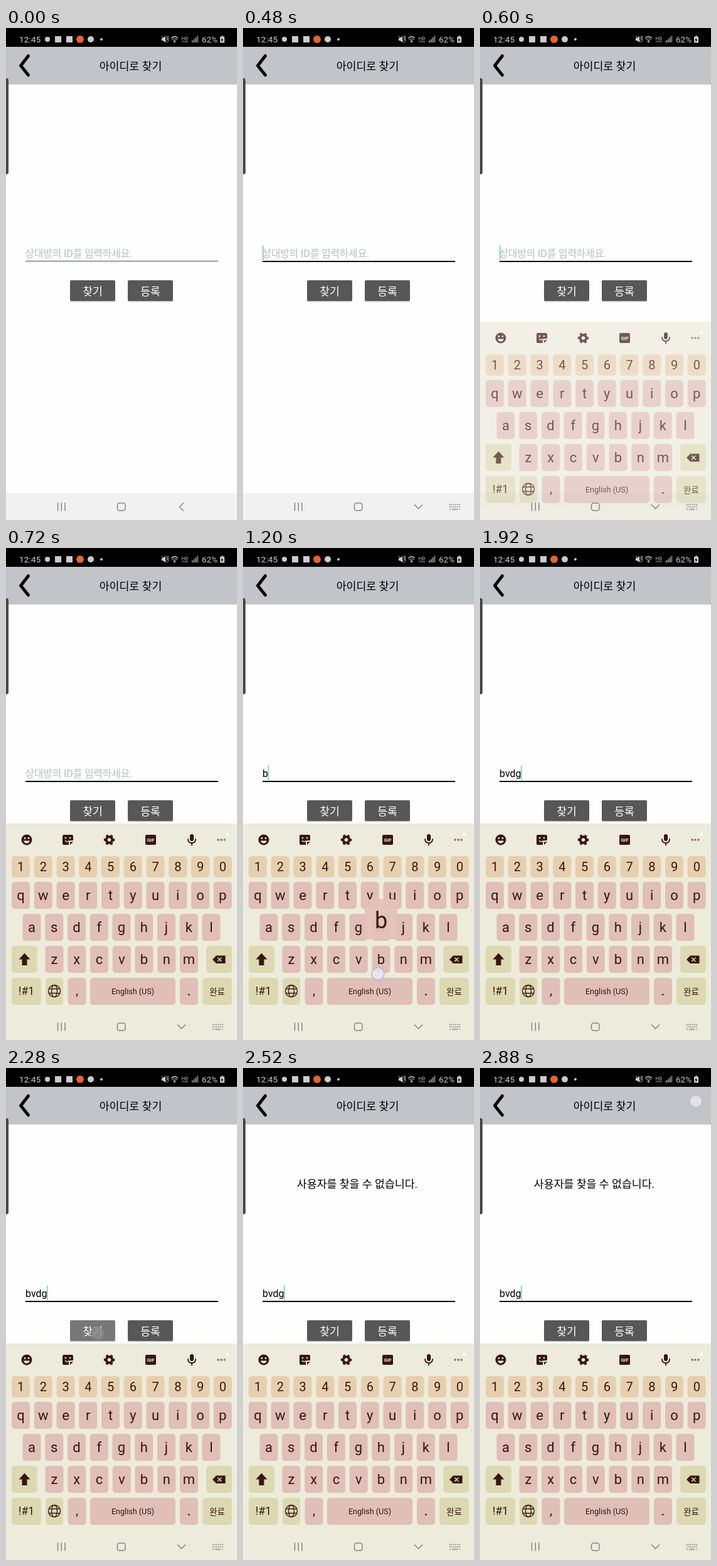
These frames come from a looping animation (368 by 784 pixels, 3000 ms). An HTML page:

```html
<!DOCTYPE html>
<html lang="ko">
<head>
<meta charset="utf-8">
<title>아이디로 찾기</title>
<style>
  html, body { margin: 0; height: 100%; overflow: hidden; background: #fefefe; }
  svg { display: block; width: 368px; height: 784px; }
  text { font-family: Roboto, "Noto Sans CJK KR", "Noto Sans CJK", sans-serif; }
  .mid { text-anchor: middle; }
  .line { fill: none; stroke-linecap: round; stroke-linejoin: round; }
</style>
</head>
<body>
<svg viewBox="0 0 368 784">
  <rect width="368" height="784" fill="#fefefe"/>

  <!-- status bar -->
  <rect width="368" height="30"/>
  <g fill="#ccc">
    <text x="21" y="23" font-size="13.7">12:45</text>
    <circle cx="66" cy="18" r="4"/>
    <rect x="78" y="13" width="10" height="10"/>
    <rect x="96" y="13" width="10" height="10"/>
    <circle cx="118" cy="18" r="6" fill="#e8622c"/>
    <circle cx="135" cy="18" r="5"/>
    <circle cx="152" cy="18" r="2"/>
    <path d="M248 16h2l4-3v10l-4-3h-2z"/>
    <path class="line" stroke="#ccc" d="M248 13l9 10M256 13l1 2-1 2 1 2M259 13l-1 2 1 2-1 2 1 2"/>
    <path class="line" stroke="#ccc" stroke-width="1.2" d="M263.500 16q5-4.500 10 0M265 18.500q3.500-3 7 0M267 21q1.500-1.500 3 0"/>
    <circle cx="268.500" cy="22.500" r="1"/>
    <text x="285" y="18.500" font-size="8" class="mid">HD</text>
    <text x="285" y="23" font-size="4" class="mid">VOICE</text>
    <path d="M296 20h1.500v3h-1.500zM299 18h1.500v5h-1.500zM302 15h1.500v8h-1.500zM305 12.500h1v10.500h-1z"/>
    <text x="312" y="23" font-size="13.500">62%</text>
    <path d="M341 14h2v-1.500h3v1.500h2v9.500h-7z"/>
    <path d="M345 15.500l-3 4h2l-.5 3 3-4h-2z" fill="#000"/>
  </g>

  <!-- title bar -->
  <rect y="30" width="368" height="60" fill="#c1c4c9"/>
  <path class="line" d="M35.500 44.500L23.500 60l12 15" stroke="#000" stroke-width="5"/>
  <text class="mid" x="198.500" y="66.500" font-size="17.300">아이디로 찾기</text>
  <rect x="-6" y="80" width="10" height="153" rx="3" fill="#484848"/>

  <!-- form -->
  <text id="message" class="mid" x="182" y="191" font-size="17.300">사용자를 찾을 수 없습니다.</text>
  <text id="hint" x="30.500" y="365" font-size="15.700" fill="#b9bdbe">상대방의 ID를 입력하세요.</text>
  <text id="typed" x="31" y="365" font-size="16"></text>
  <rect id="underline" x="31" y="371" width="307"/>
  <rect id="caret" y="347" width="1.700" height="23" fill="#82cdc2"/>
  <g id="buttons"></g>

  <!-- keyboard and navigation -->
  <rect y="741" width="368" height="43" fill="#f1f1f1"/>
  <g id="keyboard"></g>
  <g class="line" stroke="#858585" stroke-width="1.500">
    <path d="M82.500 757v12M88.300 757v12M94 757v12"/>
    <rect x="177.500" y="757" width="12.500" height="12" rx="3.500"/>
    <path id="back" d="M282.500 757l-6 6 6 6"/>
    <g id="opened">
      <path d="M273.500 760l6 6 6-6"/>
      <path d="M329.500 759.500h16M329.500 763.200h16" stroke-dasharray=".1 3" stroke-width="1.800"/>
      <path d="M329.500 767h1M333.500 767h8M345 767h.5"/>
    </g>
  </g>
  <g id="popup">
    <rect width="52" height="64" rx="6" fill="#e3c2ba" opacity=".93"/>
    <text class="mid" x="26" y="46" font-size="36" fill="#38150f"></text>
  </g>
  <circle id="touch" r="10" stroke-width="1.300"/>
</svg>
<script>
const STEP = 120, LOOP = 3000;
const INK = '#38150f', PINK = '#dfbfb8', SAND = '#e6cfae', OLIVE = '#dcd9b2', BASE = '#edebdc';
const WORD = 'bvdg', TYPE_START = 1200;
const PITCH = 35.75;
const $ = id => document.getElementById(id);
const show = (id, on) => $(id).style.display = on ? '' : 'none';
const set = (el, attrs) => { for (const k in attrs) el.setAttribute(k, attrs[k]); };
const label = (s, x, y, size, fill = INK) =>
  `<text class="mid" x="${x}" y="${y}" font-size="${size}" fill="${fill}">${s}</text>`;
const box = (x, y, w, h, fill, r = 5) =>
  `<rect x="${x}" y="${y}" width="${w}" height="${h}" rx="${r}" fill="${fill}"/>`;
const keys = {};

function row(chars, firstX, top, height, fill, size) {
  return [...chars].map((c, i) => {
    const x = firstX + i * PITCH, y = top + height / 2;
    keys[c] = { x, y };
    return box(x - 14.5, top, 29, height, fill) + label(c, x, y + 7, size);
  }).join('');
}

const button = (x, s) =>
  box(x, 403.5, 72, 33, '#ccc', 2) + box(x, 402, 72, 33, '#575757', 2) + label(s, x + 36, 425.500, 17.2, '#fff');
$('buttons').innerHTML = button(102, '찾기') + button(194, '등록');
const findButton = $('buttons').children[1];

const toolbar = `
  <circle cx="33" cy="465" r="8.500"/>
  <g fill="${BASE}"><circle cx="30" cy="462.500" r="1.400"/><circle cx="36" cy="462.500" r="1.400"/>
    <path d="M28 466.500h10q-1.500 4-5 4t-5-4z"/></g>
  <path d="M92 457h13q2 0 2 2v7h-3q-4 0-4 4v3h-8q-2 0-2-2v-12q0-2 2-2zM102 473v-3q0-2 2-2h3z"/>
  <g fill="${BASE}"><circle cx="95" cy="462" r="1.300"/><circle cx="102" cy="462" r="1.300"/></g>
  <path class="line" d="M94.500 466.500q3 3 6 0" stroke="${BASE}" stroke-width="1.300"/>
  <g fill="none" stroke="${INK}"><circle cx="164.500" cy="465" r="4.800" stroke-width="4"/>
    <circle cx="164.500" cy="465" r="7.200" stroke-width="3" stroke-dasharray="3.800 3.740" stroke-dashoffset="1.900"/></g>
  ${box(222, 457, 17, 16, INK, 2)}
  <text class="mid" x="230.500" y="468" font-size="8" font-weight="bold" fill="${BASE}">GIF</text>
  ${box(293, 456, 6, 11, INK, 3)}
  <path class="line" d="M290 464q0 6 6 6t6-6M296 470v3.500" stroke="${INK}" stroke-width="1.800"/>
  <g fill="#846f66"><circle cx="338" cy="465" r="1.800"/><circle cx="343" cy="465" r="1.800"/><circle cx="348" cy="465" r="1.800"/></g>
  <circle cx="352.500" cy="456.500" r="2.500" fill="#fff"/>`;

const controls = `
  ${box(9, 634, 41, 43, OLIVE)}${box(319, 634, 41, 43, OLIVE)}
  <path d="M29.500 645.500l9 10h-5v9.500h-8v-9.500h-5z"/>
  <path d="M335 649.500h14.500v12.500h-14.500l-6-6.250z"/>
  <path class="line" d="M337.500 653l5.500 5.500M343 653l-5.500 5.500" stroke="${OLIVE}" stroke-width="1.600"/>
  ${box(9, 685, 47, 43, OLIVE)}${label('!#1', 32.500, 712, 17.5)}
  ${box(63, 685, 28, 43, OLIVE)}
  <g fill="none" stroke="${INK}" stroke-width="1.300"><circle cx="77" cy="706" r="9.500"/>
    <ellipse cx="77" cy="706" rx="4.500" ry="9.500"/><path d="M68.500 702.500h17M68.500 709.500h17"/></g>
  ${box(98.5, 685, 29, 43, PINK)}${label(',', 113, 712, 21)}
  ${box(134, 685, 136, 43, PINK)}${label('English (US)', 202, 711, 12.6)}
  ${box(277, 685, 29, 43, PINK)}${label('.', 291.500, 713, 24)}
  ${box(313, 685, 47, 43, OLIVE)}${label('완료', 336.500, 711.500, 13.3)}`;

$('keyboard').innerHTML = `<rect y="439" width="368" height="345" fill="${BASE}"/><g fill="${INK}">` + toolbar +
  row('1234567890', 23.5, 491, 34, SAND, 20) +
  row('qwertyuiop', 23.5, 532, 43, PINK, 22) +
  row('asdfghjkl', 41, 583, 43, PINK, 22) +
  row('zxcvbnm', 77, 634, 43, PINK, 22) + controls + '</g>';

function touch(x, y, pressing) {
  show('touch', true);
  set($('touch'), { cx: x, cy: y, fill: pressing ? '#8b8b8b' : '#e6e4ee',
    stroke: pressing ? '#858585' : '#b5b1bd', opacity: pressing ? .8 : .9 });
}

function draw(t) {
  const focused = t >= 360;
  const count = t < TYPE_START ? 0 : Math.min(WORD.length, Math.floor((t - TYPE_START) / STEP) + 1);
  const typing = count > 0 && t < TYPE_START + WORD.length * STEP;
  const finding = t >= 2160 && t < 2400;

  $('typed').textContent = WORD.slice(0, count);
  show('hint', !count);
  show('caret', focused && !(t >= 720 && t < 1080));
  set($('caret'), { x: 31 + (count ? $('typed').getComputedTextLength() - .5 : 0) });
  set($('underline'), { y: 371, height: focused ? 2 : 1, fill: focused ? '#000' : '#4b5052' });

  show('back', !focused);
  show('opened', focused);
  show('keyboard', t >= 600);
  const sliding = t < 720;
  set($('keyboard'), { transform: `translate(0 ${sliding ? 29 : 0})`, opacity: sliding ? .7 : 1 });

  show('popup', typing);
  show('touch', false);
  if (typing) {
    const letter = WORD[count - 1], { x, y } = keys[letter];
    set($('popup'), { transform: `translate(${x - 26} ${y - 96})` });
    $('popup').lastElementChild.textContent = letter;
    touch(x - 5, y + 23);
  }
  set(findButton, { fill: finding ? '#777' : '#575757' });
  if (finding) touch(146, 423, true);
  show('message', t >= 2520);
  if (t >= 2880) touch(344, 53);
}

function tick() {
  draw(Math.floor(performance.now() % LOOP / STEP) * STEP);
  requestAnimationFrame(tick);
}
tick();
</script>
</body>
</html>
```
